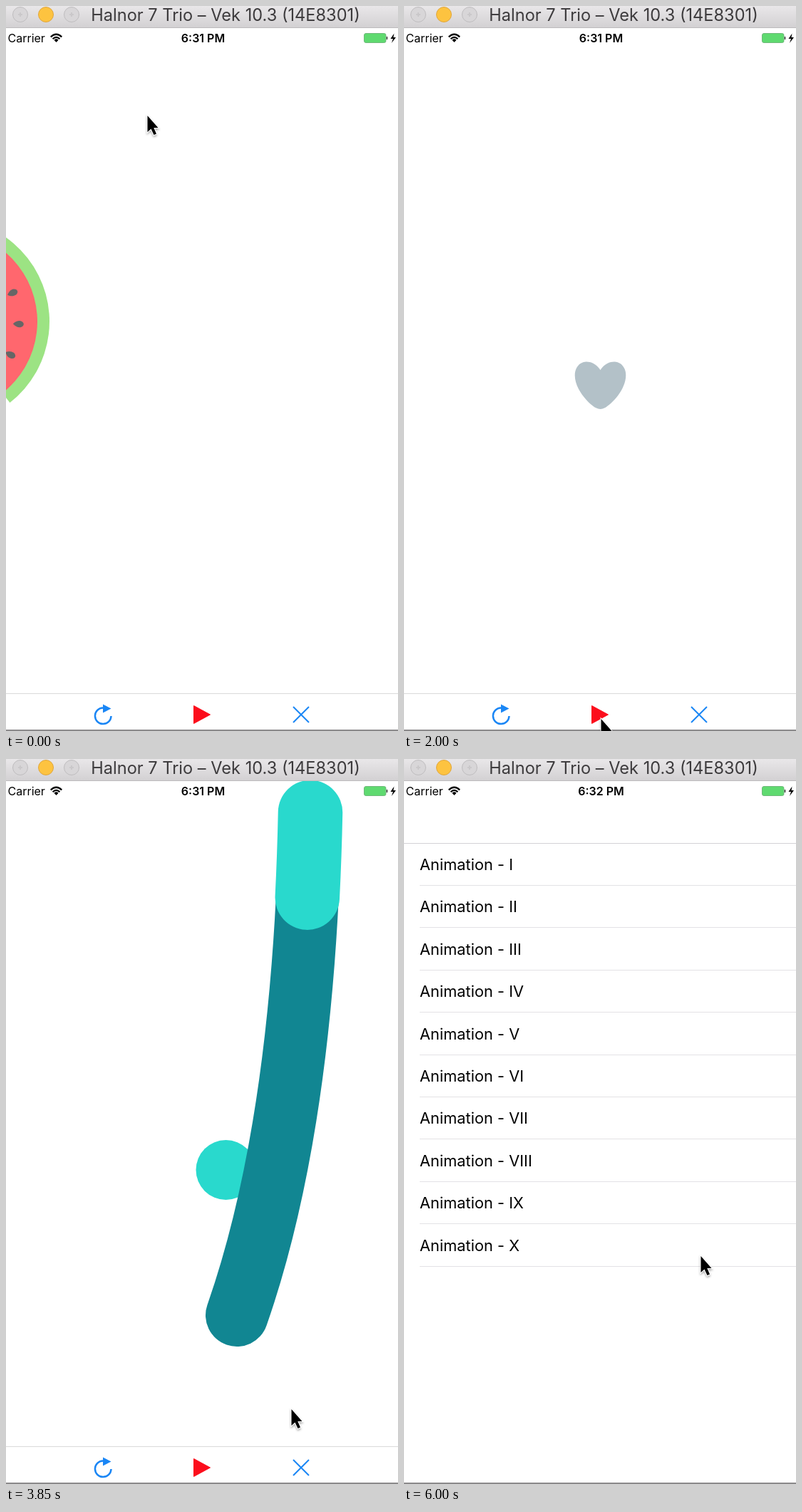
Recreate the animation shown at these times as an HTML page. Size 550 px wide and 1018 px high, loop 6050 ms.

```html
<!DOCTYPE html>
<html lang="en">
<head>
<meta charset="utf-8">
<style>
html, body { margin: 0; width: 100%; height: 100%; overflow: hidden; background: #fff; }
svg { display: block; width: 550px; height: 1018px; font-family: Inter, Roboto, sans-serif; }
</style>
</head>
<body>
<svg viewBox="0 0 550 1018">
  <defs>
    <linearGradient id="bar" x2="0" y2="1">
      <stop stop-color="#e9e7e9"/><stop offset="1" stop-color="#d2d0d2"/>
    </linearGradient>
    <clipPath id="screen"><path d="M0 31H550V1016H0z"/></clipPath>
    <filter id="shadow" x="-50%" y="-50%" width="200%" height="200%">
      <feDropShadow dx="0" dy="2" stdDeviation="1.5" flood-opacity=".35"/>
    </filter>
  </defs>
  <rect width="550" height="1018" fill="#fff"/>

  <g clip-path="url(#screen)">
    <g id="list" font-size="21.8"></g>
    <g id="sheet">
      <rect y="31" width="550" height="990" fill="#fff"/>

      <g id="melon" class="scene"></g>

      <g id="heart" class="scene">
        <path fill="#b3c1c8" d="M275.5 513.500C271 506 264 503 258 503C250 503 243.5 510 243.5 520C243.5 538 261 556 270 561Q275.5 564 281 561C290 556 307.5 538 307.5 520C307.5 510 301 503 293 503C287 503 280 506 275.5 513.500z"/>
      </g>

      <g id="arc" class="scene" fill="none" stroke-linecap="round">
        <circle cx="308.500" cy="577" r="42" fill="#29d9cd"/>
        <path id="dark" pathLength="100" stroke="#118692" stroke-width="88" d="M324 781Q418 512 427 75"/>
        <path id="light" pathLength="100" stroke="#29d9cd" stroke-width="90.500" d="M324 781Q418 512 427 75"/>
      </g>

      <g id="place" class="scene">
        <path id="road" stroke="#e5e5e5" stroke-width="2"/>
        <circle id="dotA" cy="630" r="8" fill="#e3e3e3"/>
        <circle id="dotB" cy="630"/>
        <g id="pin">
          <path fill="#f6494c" d="M282 629C262 598 232 548 232 520A53 53 0 0 1 338 520C338 548 302 600 282 629z"/>
          <circle cx="285" cy="520" r="28.500" fill="#fff"/>
        </g>
      </g>

      <path d="M0 965.500H550" stroke="#dadada"/>
      <g id="redo">
        <path d="M136 985.500A11.300 11.300 0 1 0 147.500 997" fill="none" stroke="currentColor" stroke-width="2.500"/>
        <path d="M136 980.500L147.500 986.500L136 992.500z" fill="currentColor"/>
      </g>
      <path id="play" d="M263.500 982.500L286.500 995L263.500 1007.500z" stroke-width="1" stroke-linejoin="round"/>
      <path d="M403 984L425 1006M425 984L403 1006" stroke="#1a86f5" stroke-width="2"/>
    </g>
  </g>

  <rect width="550" height="31" fill="url(#bar)"/>
  <path d="M0 30.500H550" stroke="#bdbbbd"/>
  <g fill="#d8d6d8" stroke="#bfbdbf">
    <circle cx="20" cy="12" r="10.500"/>
    <circle cx="56" cy="12" r="10.500" fill="#fdc340" stroke="#e0a63c"/>
    <circle cx="92" cy="12" r="10.500"/>
    <path d="M17 12h6M20 9v6M89 12h6M92 9v6" stroke="#cac8ca" stroke-width="2"/>
  </g>
  <text x="308" y="21" font-size="23.600" text-anchor="middle" fill="#3d3b3d">Halnor 7 Trio – Vek 10.3 (14E8301)</text>

  <text x="2.500" y="51" font-size="16">Carrier</text>
  <g fill="none" stroke="#000" stroke-width="2.300">
    <path d="M62.800 43.500Q70.500 36 78.200 43.500M65.600 46.300Q70.500 41.500 75.400 46.300"/>
    <path d="M67.500 47.700Q70.500 45 73.500 47.700L70.500 51z" fill="#000" stroke="none"/>
  </g>
  <text id="clock" x="276.500" y="51" font-size="16" font-weight="600" text-anchor="middle"></text>
  <rect x="502.500" y="38.500" width="30.500" height="13" rx="2.500" fill="#5fda70" stroke="#6fb87a"/>
  <path d="M534.500 43v4" stroke="#333" stroke-width="1.500"/>
  <path d="M544.500 38.500L539.500 46H543L541 52L547 44H543.500z"/>

  <path d="M0 1017H550" stroke="#8b8a8b" stroke-width="2"/>
  <path id="cursor" filter="url(#shadow)" stroke="#fff" stroke-width="1.800" paint-order="stroke"
    d="M.5 1V24L5.500 19.500L9.500 28L13 26.500L9.300 18H15.500z"/>
</svg>
<script>
const LOOP = 6050, STEP = 50;
const $ = id => document.getElementById(id);
const set = (id, attrs) => { for (const k in attrs) $(id).setAttribute(k, attrs[k]); };
const clamp = v => Math.max(0, Math.min(1, v));
const ease = u => u * u * (3 - 2 * u);
const ramp = (t, a, b) => ease(clamp((t - a) / (b - a)));
const mix = (a, b, u) => a + (b - a) * u;

// Each scene slides up, stays, then slides down: in from, in to, out from, out to
const scenes = {
  melon: [-200, -100, 500, 650],
  heart: [800, 1000, 2620, 2800],
  arc: [3100, 3300, 3920, 4080],
  place: [4180, 4340, 5870, 6000]
};

// Pointer stops: time, x, y
const stops = [
  [0, 198, 153], [150, 198, 153], [450, 413, 990], [520, 413, 990], [740, 300, 205],
  [820, 300, 205], [1100, 276, 1000], [2200, 276, 1000], [2500, 413, 990], [2650, 413, 990],
  [2850, 452, 650], [3050, 430, 265], [3150, 430, 265], [3850, 400, 912], [3900, 413, 990],
  [3980, 413, 990], [4150, 425, 325], [4220, 425, 325], [4400, 425, 921], [4850, 274, 987],
  [5400, 274, 987], [5750, 413, 990], [5870, 413, 990], [6000, 416, 697], [LOOP, 416, 697]
];

const numerals = ['I', 'II', 'III', 'IV', 'V', 'VI', 'VII', 'VIII', 'IX', 'X'];
$('list').innerHTML = '<path d="M0 118.500H550" stroke="#d3d2d5"/>' + numerals.map((n, i) => {
  const y = 59.4 * i;
  return `<text x="22" y="${156 + y}">Animation - ${n}</text>
    <path d="M22 ${Math.round(177 + y) + 0.5}H550" stroke="#e3e2e5"/>`;
}).join('');

// Half slice, centred on the origin with its flat side along x
const half = (r, color) => `<path d="M${-r} 0A${r} ${r} 0 0 1 ${r} 0z" fill="${color}"/>`;
let slice = half(144.6, '#9ce383') + half(127.6, '#ff676e');
for (let i = 0; i < 6; i++) {
  slice += `<path transform="rotate(${-151.6 + 25.4 * i}) translate(101 0)" fill="#666"
    d="M-7.500 0C-4 -4 0 -5 3 -4.500C9 -3 9 3 3 4.500C0 5 -4 4 -7.500 0z"/>`;
}
$('melon').innerHTML = slice;

function pointer(t) {
  const i = Math.max(1, stops.findIndex(s => s[0] > t));
  const [t0, x0, y0] = stops[i - 1], [t1, x1, y1] = stops[i];
  const u = (t - t0) / (t1 - t0);
  return [mix(x0, x1, u), mix(y0, y1, u)];
}

function draw(t) {
  let offset = 990;
  for (const id in scenes) {
    const [a, b, c, d] = scenes[id];
    const on = t >= a && t < d;
    $(id).style.display = on ? '' : 'none';
    if (on) offset = 990 * (1 - ramp(t, a, b) + ramp(t, c, d));
  }
  set('sheet', { transform: `translate(0 ${offset})` });

  const roll = ramp(t, -150, 480), start = ramp(0, -150, 480);
  const u = (roll - start) / (1 - start);
  set('melon', { transform: `translate(${mix(-83.6, 275, u)} 443) rotate(${52 + 128 * u})` });

  const beat = t > 1200 && t < 2500 ? 1 + 0.12 * Math.sin((t - 1200) / 1300 * Math.PI * 4) ** 2 : 1;
  set('heart', { transform: `translate(275.5 533) scale(${beat}) translate(-275.5 -533)` });

  // The light segment leads, the dark one fills the path behind it
  const tail = mix(0.3, 83.3, clamp((t - 3300) / 550));
  set('dark', { 'stroke-dasharray': `${tail} 300` });
  set('light', { 'stroke-dasharray': '16.7 300', 'stroke-dashoffset': -tail });

  const go = ramp(t, 4400, 5050);
  set('road', { d: `M${mix(72, 79, go)} 630H497` });
  set('dotA', { cx: mix(201.5, 161.5, go) });
  set('dotB', {
    cx: mix(454, 397.5, go), r: mix(15, 8, go),
    fill: `rgb(${mix(246, 227, go)},${mix(73, 227, go)},${mix(76, 227, go)})`
  });
  set('pin', { transform: `translate(0 629) scale(1 ${mix(0.9, 1, go)}) translate(0 -629)` });

  const pressed = t >= 4900 && t < 6000;
  const tint = pressed ? '#45d2c9' : '#fc0d1c';
  set('redo', { color: pressed ? '#fc0d1c' : '#1a86f5' });
  set('play', { fill: tint, stroke: tint });

  $('clock').textContent = t < 5500 ? '6:31 PM' : '6:32 PM';
  set('cursor', { transform: `translate(${pointer(t).join(' ')})` });
}

function frame() {
  draw(Math.floor(performance.now() % LOOP / STEP) * STEP);
  requestAnimationFrame(frame);
}
frame();
</script>
</body>
</html>
```
